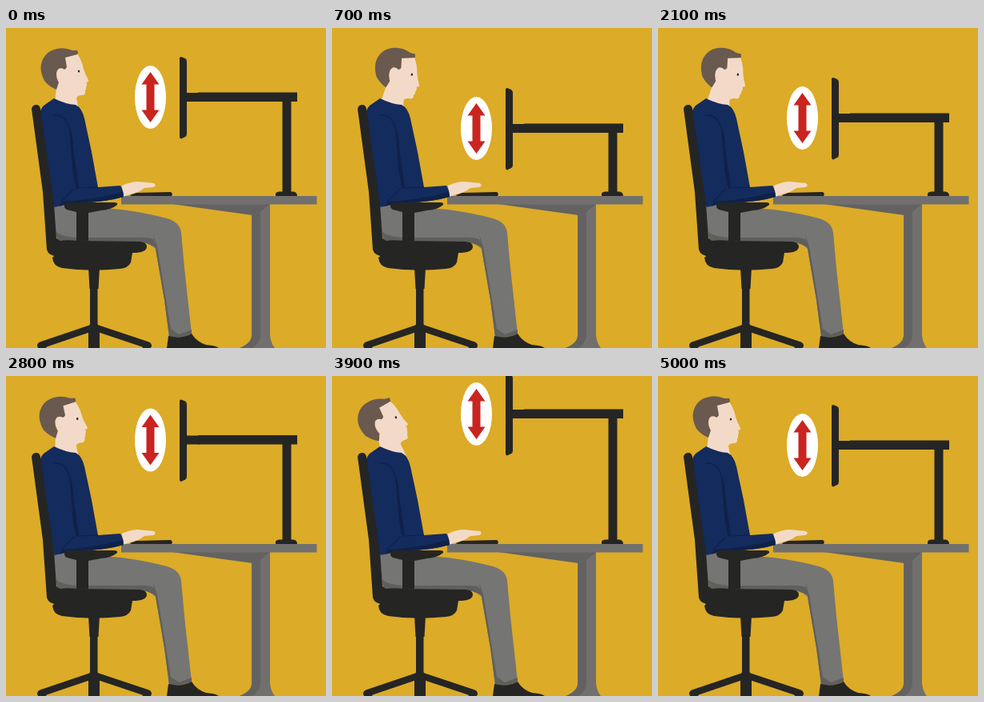
These frames come from a looping animation (400 by 400 pixels, 5.1 s). An HTML page with a canvas:

```html
<!DOCTYPE html>
<html lang="en">
<head>
<meta charset="utf-8">
<title>Monitor height</title>
<style>
html, body { margin: 0; width: 100%; height: 100%; overflow: hidden; background: #dcab27; }
canvas { display: block; width: 400px; height: 400px; }
</style>
</head>
<body>
<canvas id="stage" width="400" height="400"></canvas>
<script>
const ctx = document.getElementById('stage').getContext('2d');
const LOOP = 5100;
const STEP = 100;
const NOTCH = 6.5;
const COLORS = {
  wall: '#dcab27', black: '#252524', skin: '#f3dac8', hair: '#69594e',
  navy: '#142b5e', fold: '#0f2149', trousers: '#757573', crease: '#5f5f5d',
  desk: '#71706f', deskShade: '#636261', red: '#c92420', white: '#ffffff'
};

// Turning points of the monitor: time, and notches below its resting height.
const STOPS = [
  [0, 0], [400, 4], [700, 6], [1000, 6], [1400, 9], [1800, 9], [2100, 4], [2600, 0],
  [2800, -1], [3000, -1], [3300, -5], [3500, -6], [4500, -6], [4600, -2], [4800, 1],
  [5000, 0], [LOOP, 0]
];

function notchAt(time) {
  const now = Math.floor(time / STEP) * STEP;
  const next = STOPS.findIndex(([t]) => t > now);
  const [t0, n0] = STOPS[next - 1];
  const [t1, n1] = STOPS[next];
  return Math.round(n0 + (n1 - n0) * (now - t0) / (t1 - t0));
}

// Looking up follows every notch; looking down goes in wider steps.
const tiltAt = notch => notch > 0 ? 13 * Math.round(notch / 5) : 2.5 * notch;

function fill(color, d) {
  ctx.fillStyle = COLORS[color];
  ctx.fill(new Path2D(d));
}

function line(color, width, d) {
  ctx.strokeStyle = COLORS[color];
  ctx.lineWidth = width;
  ctx.stroke(new Path2D(d));
}

function box(color, x, y, w, h) {
  ctx.fillStyle = COLORS[color];
  ctx.fillRect(x, y, w, h);
}

function oval(color, x, y, rx, ry) {
  ctx.fillStyle = COLORS[color];
  ctx.beginPath();
  ctx.ellipse(x, y, rx, ry, 0, 0, 2 * Math.PI);
  ctx.fill();
}

function drawDesk() {
  fill('deskShade', 'M200 219H330V232L308 234Z');
  fill('desk', 'M307 234L318 230L330 220V384Q331 394 336 400H292Q307 394 307 384Z');
  fill('deskShade', 'M307.500 234L318 230V386Q316 395 308 400H292Q307 394 307.500 384Z');
  box('desk', 144, 210, 244.5, 10.5);
}

function drawHead(tilt) {
  ctx.save();
  ctx.translate(77, 95);
  ctx.rotate(tilt * Math.PI / 180);
  ctx.translate(-77, -95);
  fill('skin', `M72 34L89 32Q95 41 97 51Q99 58 103 65Q104 67 100 68Q102 70 100 74
    Q101 76 99 78Q100 84 95 84Q90 84 88 87L91 104H60L63 74Z`);
  fill('hair', `M89 33L74 37L76 49Q74 53 71 51Q66 50 64 56Q62 63 66 68L63 77
    Q55 74 48 66Q42 54 44 45Q48 29 64 26Q73 24 83 28L89 28Q91 32 89 33Z`);
  fill('skin', 'M72 51Q64 48 63 57Q63 66 69 66Q72 66 72 61Z');
  oval('black', 91, 54, 1.2, 1.6);
  ctx.restore();
}

function drawBody() {
  fill('trousers', `M58 220L145 227Q180 232 201 238Q217 242 219 256L223 300L232 382
    Q218 388 204 386L198 340L187 276Q177 266 165 268H72Q60 264 58 242Z`);
  fill('crease', 'M63 255Q72 262 95 262H160Q176 261 184 264L188 274L175 269H64Z');
  fill('crease', 'M184 258L189 273L206 376L216 383L232 377V382Q218 388 204 386L198 340L187 276Z');
  fill('black', 'M203 385Q219 389 232 382Q238 392 250 396Q263 397 266 400H201Z');

  fill('skin', 'M145 197Q156 192 165 192L185 194Q189 197 184 199L173 200Q165 206 158 207L146 211Z');
  fill('navy', `M60 88Q74 95 87 96Q95 100 98 113L107 155L115 199L143 197Q147 203 147 211
    Q120 219 84 218L61 224L52 205L40 125Q40 104 47 97Z`);
  fill('fold', 'M79 124Q83 129 84 150L91 199L88 201Q83 184 82 160Z');
  fill('fold', 'M70 217Q108 215 146 205L147 211Q120 219 84 218L66 223Z');
  line('fold', 1.2, 'M59 109Q74 107 79 125M85 201L69 217M88 200L115 199');
}

function drawChair() {
  fill('black', `M32 101Q33 96 38 96Q42 96 43 101L51 157L60 220L63 263L72 269L66 286
    Q53 285 51 277L46 205Z`);
  fill('black', `M59 268Q70 264 90 266L167 267Q176 268 176 273Q176 281 158 281L156 293
    Q153 300 142 301Q105 305 70 300Q59 298 58 287Q66 282 59 268Z`);
  fill('black', `M73 220Q78 217 88 218H135Q140 218 139 221Q132 227 119 228L103 231V266H88V230
    L76 227Q72 225 73 220Z`);
  fill('black', 'M103 300H117L115.500 326H114.500V370L117 375V400H103V375L105 370V326H104.500Z');
  for (const footX of [45, 176]) {
    line('black', 8.5, `M110 374L${footX} 396`);
    oval('black', footX, 397, 6, 5);
  }
}

function drawKeyboard() {
  fill('black', 'M155 209L163 206L206 205Q209 207 207 210H156Z');
}

function drawMonitor(top) {
  box('black', 345.5, top + 48, 11, 160 - top);
  fill('black', 'M337 210V207Q338 204.500 342 204.500H359Q364 205 364 210Z');
  ctx.save();
  ctx.translate(0, top);
  fill('black', `M217 2Q217 0 219 0L224 2Q226 3 226 6V96Q226 99 224 100L219 102.500
    Q217 102 217 100Z`);
  box('black', 225, 45, 17, 11);
  box('black', 240, 44.5, 124, 11.5);
  ctx.translate(180.5, 50.5);
  oval('white', 0, 0, 19.5, 39.5);
  fill('red', 'M0 -31.500L11 -16H5V16H11L0 31.500L-11 16H-5V-16H-11Z');
  ctx.restore();
}

function draw(time) {
  const notch = notchAt(time);
  box('wall', 0, 0, 400, 400);
  drawDesk();
  drawMonitor(36 + NOTCH * notch);
  drawHead(tiltAt(notch));
  drawBody();
  drawChair();
  drawKeyboard();
}

const begin = performance.now();
function tick() {
  draw((performance.now() - begin) % LOOP);
  requestAnimationFrame(tick);
}
tick();
</script>
</body>
</html>
```
